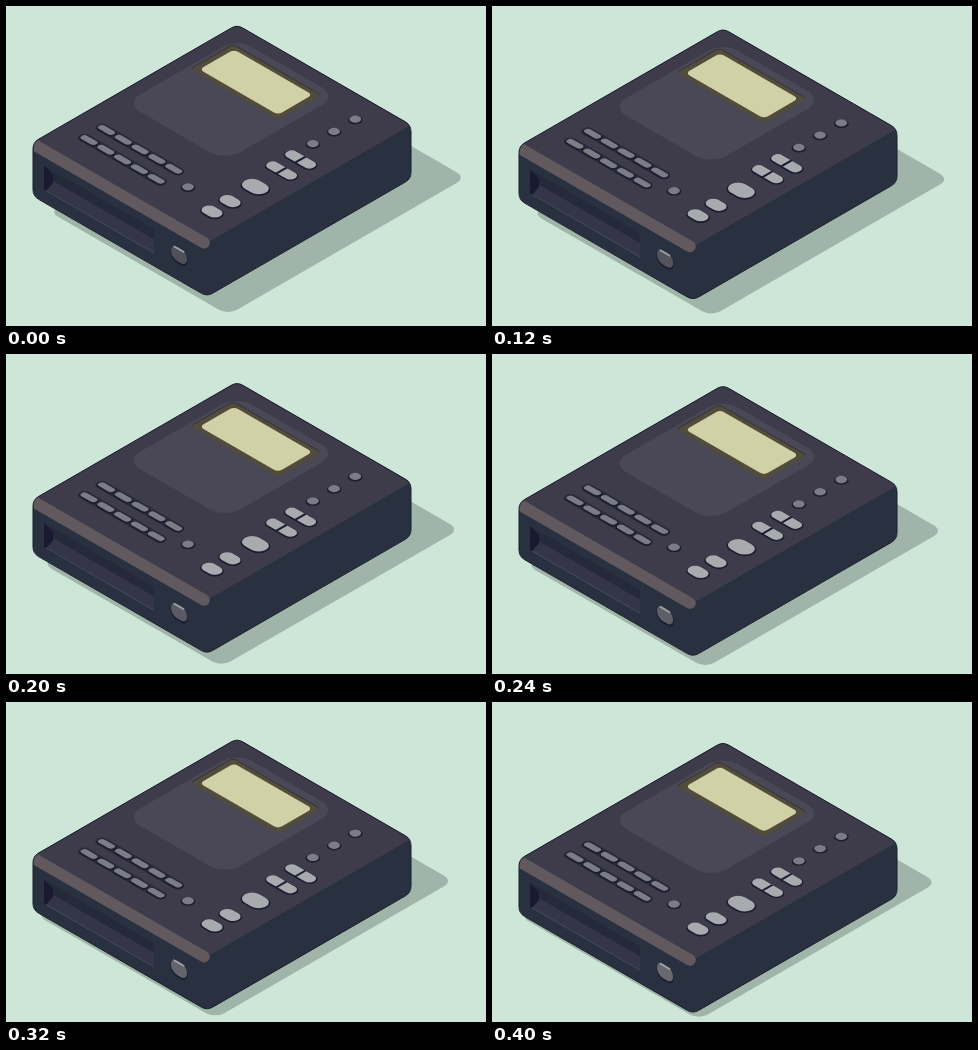
An HTML page for the animation above (0.44 s loop, 480 by 320 pixels).

```html
<!DOCTYPE html>
<html lang="en">
<head>
<meta charset="utf-8">
<title>Portable player</title>
<style>
  html, body { margin: 0; width: 100%; height: 100%; overflow: hidden; background: #cde6d8; }
  svg { display: block; width: 100vw; height: 100vh; }
</style>
</head>
<body>
<svg id="stage" viewBox="0 0 480 320" xmlns="http://www.w3.org/2000/svg">
  <defs><clipPath id="shell"><path id="shellPath"/></clipPath></defs>
  <g id="shadow"></g>
  <g id="device"></g>
</svg>
<script>
const LOOP = 440, STEP = 40, DROP = 21.6, SLIDE = 15.5;
// Isometric box: u runs down-right, v down-left, z straight down
const X0 = 231, Y0 = 18.7, SLOPE = 0.577;
const WIDTH = 174, DEPTH = 204, HEIGHT = 53.7;
const DARK = '#1b1d30', SIDE = '#29303f', LIGHT = '#a9aaae', GREY = '#7b7c86';

const el = id => document.getElementById(id);
const iso = (u, v, z = 0) => [X0 + u - v, Y0 + SLOPE * (u + v) + z];

function add(parent, tag, attrs) {
  const node = document.createElementNS('http://www.w3.org/2000/svg', tag);
  for (const key in attrs) node.setAttribute(key, attrs[key]);
  parent.appendChild(node);
  return node;
}

function plane(parent, a, b, c, d, origin) {
  return add(parent, 'g', { transform: `matrix(${[a, b, c, d, ...origin]})` });
}

function rect(parent, x, y, width, height, rx, fill) {
  return add(parent, 'rect', { x, y, width, height, rx, fill });
}

// Polygon whose corners are cut at distance r and curved
function rounded(points, r) {
  const n = points.length;
  const toward = (a, b) => {
    const k = r / Math.hypot(b[0] - a[0], b[1] - a[1]);
    return a.map((c, i) => (c + (b[i] - c) * k).toFixed(2));
  };
  return points.map((p, i) =>
    `${i ? 'L' : 'M'}${toward(p, points[(i + n - 1) % n])}Q${p} ${toward(p, points[(i + 1) % n])}`
  ).join('') + 'Z';
}

// Cast shadow on the ground plane
const ground = plane(el('shadow'), 1, SLOPE, -1, SLOPE, [X0, Y0]);
const cast = rect(ground, 68, 18, 179, 238, 9, '#a0b4a9');

// Shell
const device = el('device');
const outline = rounded([
  iso(0, 0), iso(WIDTH, 0), iso(WIDTH, 0, HEIGHT),
  iso(WIDTH, DEPTH, HEIGHT), iso(0, DEPTH, HEIGHT), iso(0, DEPTH)
], 6.5);
el('shellPath').setAttribute('d', outline);
const body = add(device, 'g', { 'clip-path': 'url(#shell)' });
add(body, 'path', { d: outline, fill: SIDE });
const lid = plane(body, 1, SLOPE, -1, SLOPE, [X0, Y0]);
rect(lid, -5, -5, WIDTH + 5, DEPTH + 5, 5, '#3e3c4a');
const trim = [iso(0, DEPTH - 2, 4), iso(WIDTH - 5, DEPTH - 2, 4)];
add(body, 'path', {
  d: `M${trim[0]}L${trim[1]}`, stroke: '#62595f', 'stroke-width': 11.5, 'stroke-linecap': 'round'
});
add(device, 'path', { d: outline, fill: 'none', stroke: '#191c2b' });

// Front face: disc slot and eject button
const front = plane(device, 1, SLOPE, 0, 1, iso(0, DEPTH));
rect(front, 11, 17, 110, 24, 1, '#242a3a');
rect(front, 14, 27, 107, 14, 0, '#343548');
add(front, 'path', { d: 'M11 17L20 21V29L13 41H11Z', fill: '#191a31' });
rect(front, 13, 40.3, 108, 0.9, 0, '#4b4c5d');
rect(front, 137.5, 21, 17, 16.5, 7, DARK);
const eject = rect(front, 138, 21, 16, 14.5, 6.5, '#50515b');
rect(front, 140.5, 21.6, 11, 2, 1, '#a0a0a7');

// Top face: display
const top3d = plane(device, 1, SLOPE, -1, SLOPE, [X0, Y0]);
rect(top3d, 12, 12, 100, 112, 15, '#4a4856');
rect(top3d, 14.5, 18.5, 88, 43, 4, '#37343a');
rect(top3d, 15.5, 19.5, 87.5, 42.5, 4, '#514c3b');
rect(top3d, 20, 23, 78.5, 34.5, 4, '#d2d0a6');

// Raised button centred at (u, v)
function button(u, v, long, wide, fill) {
  const x = u - long / 2, y = v - wide / 2, r = wide / 2;
  rect(top3d, x - 0.3, y - 0.3, long + 2, wide + 2, r + 1, DARK);
  rect(top3d, x, y, long, wide, r, fill);
}

for (const v of [156.5, 174]) {
  rect(top3d, 17, v - 4.5, 85, 9.5, 4.7, '#2a2a3a');
  for (let i = 0; i < 5; i++) button(26 + i * 16.8, v, 14.5, 5.6, GREY);
}

button(116, 165, 8.4, 8.4, GREY);
for (const v of [174.4, 156.3]) button(149.4, v, 16.5, 11, LIGHT);
button(149.4, 131, 21, 14.5, LIGHT);
for (const v of [104, 85]) {
  button(148.6, v, 27, 9.5, LIGHT);
  rect(top3d, 147.6, v - 5, 2, 10.5, 0, DARK);
}
for (let i = 0; i < 3; i++) button(141, 22.7 + i * 21.2, 8.4, 8.4, GREY);

function draw(ms) {
  const t = Math.floor((ms % LOOP) / STEP) * STEP;
  const p = (1 - Math.cos(Math.PI * t / LOOP)) / 2;
  device.setAttribute('transform', `translate(0 ${(DROP * p).toFixed(2)})`);
  cast.setAttribute('transform', `translate(0 ${(SLIDE * p).toFixed(2)})`);
  const g = Math.round(80 + 24 * p);
  eject.setAttribute('fill', `rgb(${g},${g},${g + 9})`);
}

const start = performance.now();
function tick() {
  draw(Math.max(0, performance.now() - start));
  requestAnimationFrame(tick);
}
draw(0);
requestAnimationFrame(tick);
</script>
</body>
</html>
```
